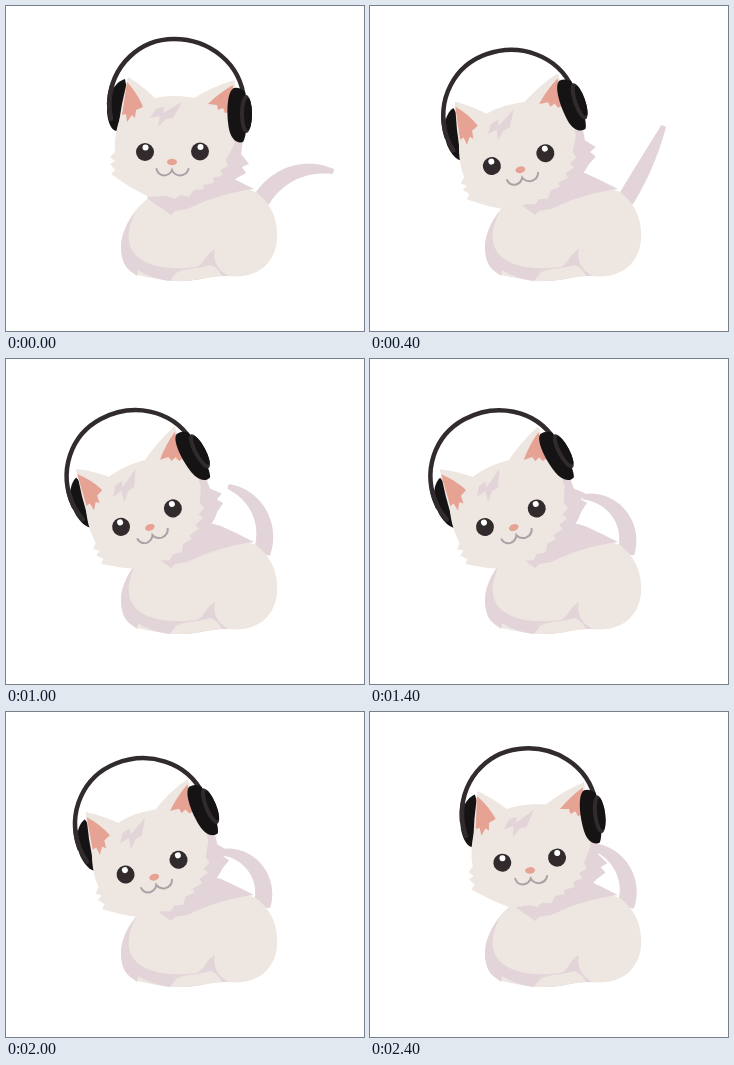
Animation of 358 by 325 pixels, one loop 2500 ms. Source, as an HTML page:

```html
<!DOCTYPE html>
<html lang="en">
<head>
<meta charset="utf-8">
<title>Cat with headphones</title>
<style>
html, body { margin: 0; width: 100%; height: 100%; overflow: hidden; background: #fff; }
svg { display: block; width: 358px; height: 325px; }
.fur { fill: #eee6e1; }
.shade { fill: #e2d4d8; }
.pink { fill: #e6a293; }
.black { fill: #151314; }
.dark { fill: #322b2e; }
.line { fill: none; stroke-linecap: round; }
</style>
</head>
<body>
<svg viewBox="0 0 358 325">
  <path id="tail" class="shade" stroke="#e2d4d8" stroke-width="3" stroke-linejoin="round"/>

  <g id="body">
    <path class="fur" d="M146 190C128 201 116 222 115 240C115 255 121 265 131 269C145 272 160 275 174 275C190 275 205 270 220 270C238 272 252 268 261 258C269 249 272 238 271 225C270 209 263 196 250 186L236 181L190 175Z"/>
    <path class="shade" d="M130 205C119 219 115 231 115 241C115 254 119 262 126 266L131 270L132 264C141 270 152 273 163 275L168 266C175 263 183 263 189 261C170 264 148 262 136 254C121 245 118 228 130 205Z"/>
    <path class="shade" d="M209 243C201 247 200 254 193 260C184 264 174 262 166 268L161 274C174 276 192 275 207 270L222 270C212 264 206 255 209 243Z"/>
    <path class="fur" d="M170 267C178 262 193 263 204 259C211 261 214 266 216 270C200 271 187 275 174 275L164 275Z"/>
    <path class="shade" d="M141 192L152 200L157 203L165 209L169 205L181 203C202 193 224 186 248 183L232 175L215 167L190 160L150 175Z"/>
  </g>

  <g id="head">
    <g class="phones">
      <path class="black" d="M119 73C108 76 101 91 101 106C102 118 106 125 111 125C117 123 122 112 124 99Z"/>
      <path class="line" stroke="#322b2e" stroke-width="4.500" d="M106 80Q101 96 105 113"/>
    </g>
    <path class="mane shade" d="M222 115L237 134L235 148L243 158L236 161L240 167L231 172L225 177L205 189L184 194L190 160Z"/>
    <g class="skull">
      <path class="fur" d="M122 71L116 98L111 128L150 112L152 95Q137 80 122 71Z"/>
      <path class="fur" d="M229 74Q207 80 185 94L190 115L228 130Z"/>
      <path class="fur" d="M146 93C158 89 178 89 192 93L212 103L229 128L228 139L220 154L222 160L214 164L217 169L207 172L208 177L197 179L198 183L188 184L183 191L174 189L169 193L161 190L143 191L124 181L105 168L109 164L104 158L109 155L104 151L109 146C108 132 111 119 116 107C124 98 135 95 146 93Z"/>
      <path class="pink" d="M121 76L116 109L120 108L121 116L126 109L129 112L130 104L137 101Q132 88 121 76Z"/>
      <path class="pink" d="M227 79Q213 87 202 98L211 99L212 104L217 102L219 107L225 106Z"/>
      <path class="shade" d="M150 103L144 112L154 110L152 121L160 113L167 112L176 96L164 103L157 107L158 101Z"/>
    </g>

    <g class="dark"><circle cx="139" cy="146" r="9"/><circle cx="194" cy="145.5" r="9"/></g>
    <g fill="#fff"><circle cx="139.500" cy="141.5" r="3"/><circle cx="194.500" cy="141" r="3"/></g>
    <ellipse class="pink" cx="166" cy="156" rx="5" ry="3.3"/>
    <path class="line" stroke="#aba2a7" stroke-width="2" d="M150.500 163Q152 169 158 169.500Q164 169 166 164Q168 169 174 169.500Q181 169 182.500 163"/>

    <g class="phones">
      <path class="line" stroke="#322b2e" stroke-width="4.500" d="M103 98C105 58 135 33 168 33C203 33 235 57 238 94"/>
      <path class="black" d="M228 82C221 85 220 107 223 123C225 133 231 138 237 136C242 128 242 98 239 86Q234 81 228 82Z"/>
      <ellipse class="dark" cx="240" cy="108" rx="6" ry="19"/>
      <ellipse class="black" cx="242" cy="108" rx="4" ry="16"/>
    </g>
  </g>
</svg>
<script>
const LOOP = 2500, STEP = 100;
const RAD = Math.PI / 180;

// [time in s, value]
const tilt = [[0, 0], [.2, 8.4], [.6, 16.3], [1, 19.1], [1.25, 19.5], [1.8, 17.4], [2.2, 11.4], [2.4, 4.8], [2.5, 0]];
const tailRoot = [[0, -57], [.2, -57], [.6, -62], [1, -73], [1.8, -76], [2.5, -74]];
const tailEnd = [[0, 17], [.2, -15], [.6, -115], [1, -164], [1.4, -184], [1.8, -191], [2.2, -184], [2.5, -172]];

// Smooth curve through the keys
function curve(keys, t) {
  const last = keys.length - 1;
  let i = 0;
  while (i < last - 1 && t >= keys[i + 1][0]) i++;
  const slope = k => {
    const a = keys[Math.max(k - 1, 0)], b = keys[Math.min(k + 1, last)];
    return (b[1] - a[1]) / (b[0] - a[0]);
  };
  const [t0, v0] = keys[i], [t1, v1] = keys[i + 1];
  const d = t1 - t0, u = (t - t0) / d, w = 1 - u;
  return v0 * w * w * (1 + 2 * u) + v1 * u * u * (3 - 2 * u)
    + d * u * w * (slope(i) * w - slope(i + 1) * u);
}

// Tapered tail that bends evenly from its root to its end direction
function tailPath(root, end) {
  const n = 24, length = 81, left = [], right = [];
  let x = 256, y = 193;
  for (let i = 0; i <= n; i++) {
    const s = i / n, a = (root + (end - root) * s) * RAD;
    const half = 7.2 - 6 * s * s;
    const dx = Math.cos(a), dy = Math.sin(a);
    left.push([x + dy * half, y - dx * half]);
    right.unshift([x - dy * half, y + dx * half]);
    x += dx * length / n;
    y += dy * length / n;
  }
  return "M" + left.concat(right).map(p => p.map(v => v.toFixed(2))).join("L") + "Z";
}

const tail = document.getElementById("tail");
const turn = (selector, angle, x, y) => document.querySelectorAll(selector).forEach(
  el => el.setAttribute("transform", `rotate(${-angle} ${x} ${y})`));

function draw(ms) {
  const t = Math.floor(ms % LOOP / STEP) * STEP / 1000;
  const angle = curve(tilt, t);
  turn("#head", angle, 192, 228);
  // Outer layers lean further than the face
  turn(".skull", angle * .3, 174, 140);
  turn(".mane", angle * .45, 174, 140);
  turn(".phones", angle * .47, 190, 118);
  tail.setAttribute("d", tailPath(curve(tailRoot, t), curve(tailEnd, t)));
}

const start = performance.now();
function tick() {
  draw(performance.now() - start);
  requestAnimationFrame(tick);
}
tick();
</script>
</body>
</html>
```
